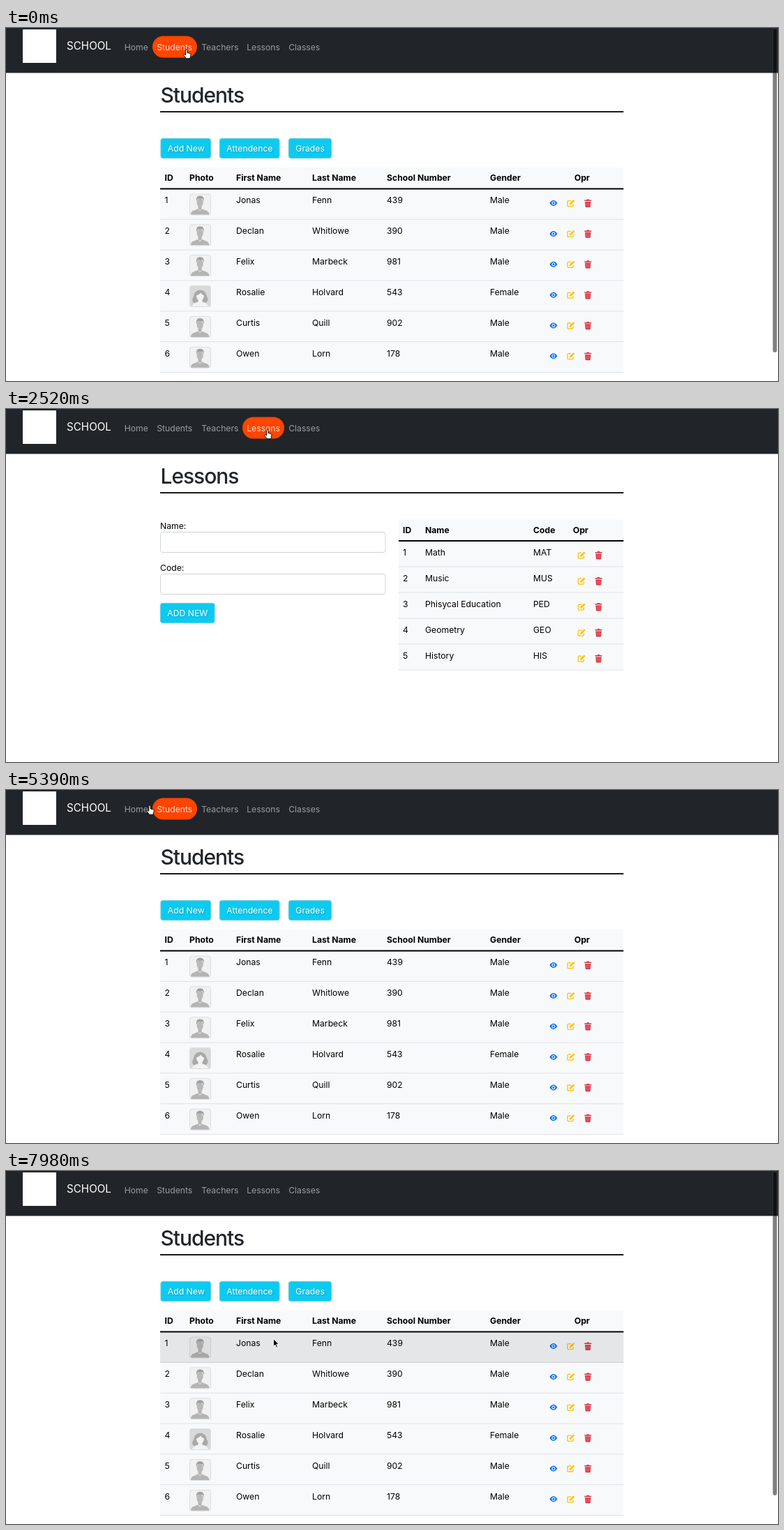
These frames come from a looping animation (1107 px wide and 506 px high, 8000 ms). An HTML page:

```html
<!DOCTYPE html>
<html lang="en">
<head>
<meta charset="utf-8">
<title>School</title>
<style>
html, body { margin: 0; width: 100%; height: 100%; overflow: hidden; background: #fff; }
svg { display: block; }
text { font: 12.2px Inter, Roboto, sans-serif; font-optical-sizing: none; fill: #000; }
.h { font-weight: 700; }
.title { font-size: 30px; font-weight: 500; letter-spacing: -1.05px; fill: #212529; }
.brand { font-size: 15.2px; fill: #fff; }
.label { font-weight: 500; fill: #6c757d; text-anchor: middle; }
.count { font-size: 24px; font-weight: 700; fill: #212529; text-anchor: middle; }
.light { fill: #fff; filter: drop-shadow(1px 1px 1px rgba(0,0,0,.2)); }
.board { font-size: 8px; font-style: italic; font-weight: 600; text-anchor: middle; }
.btn { fill: #0dcaf0; stroke: #5fcfe6; filter: drop-shadow(0 0 1px rgba(0,0,0,.15)); }
.soft { filter: blur(4px); }
.line { fill: none; stroke: #000; stroke-linecap: round; stroke-linejoin: round; }
</style>
</head>
<body>
<svg width="1107" height="506" viewBox="0 0 1107 506">
  <defs>
    <g id="male">
      <rect x=".5" y=".5" width="30" height="30" rx="3" fill="#f1f1f1" stroke="#dcdee0"/>
      <path d="M2 30q0-5 4.500-6l6-2.500v-4h5v4l6 2.500q4.500 1 5 6z" fill="#b4b4b4"/>
      <ellipse cx="15.200" cy="12.500" rx="4.600" ry="6.500" fill="#b9b9b9"/>
      <path d="M10 11q-1-8 5-8 7 0 5.500 8l-1.500-4h-7z" fill="#9f9f9f"/>
      <path d="M12 21l3.200 3.500 3.200-3.500" fill="none" stroke="#e9e9e9"/>
    </g>
    <g id="female">
      <rect x=".5" y=".5" width="30" height="30" rx="3" fill="#d9d9d9" stroke="#dcdee0"/>
      <path d="M5 24q-2-4 1-8 1-9 9.500-9.500 8 .5 9.500 9.500 3 4 0 8-3 3-6 1h-7q-4 2-7-1z" fill="#a9a9a9"/>
      <path d="M4 30q1-5 8.500-6.500v-3q-3-3-2.500-6 4-1 6-4 2 3 5 4 0 4-2.500 6v3q7.500 1.500 8.500 6.500z" fill="#f3f3f3"/>
    </g>
    <g id="eye">
      <path d="M-5.500 0Q-3-4 0-4T5.500 0Q3 4 0 4T-5.500 0z" fill="#0d6efd"/>
      <circle r="2.500" fill="#fff"/><circle r="1.500" fill="#0d6efd"/>
    </g>
    <g id="edit" fill="none" stroke="#ffc107" stroke-width="1.300">
      <path d="M.5-3.500H-3.500q-1 0-1 1V3.500q0 1 1 1H2.500q1 0 1-1V1"/>
      <path d="M-1.500 2l.4-2L4-4.800l1.500 1.500L.4 1.700z" fill="#ffc107" stroke-width=".6"/>
    </g>
    <g id="trash" fill="#dc3545">
      <path d="M-5-4.500h3l.6-1h2.800l.6 1h3V-3H-5zM-4.200-2.200h8.400l-.6 7q-.1 1-1 1h-5.200q-.9 0-1-1z"/>
      <path d="M-2-.8v5M0-.8v5M2-.8v5" stroke="#e98a93" stroke-width=".7"/>
    </g>
    <g id="suit">
      <circle cy="178" r="7.500"/>
      <path d="M-9 187h18q6 2 6 9v20q0 3-3 3H9v19q0 3-3 3H1.200V214h-2.400v27H-6q-3 0-3-3v-19h-3q-3 0-3-3v-20q0-7 6-9z" stroke="#fff"/>
      <path d="M-5 187l5 18 5-18z" fill="#fff"/>
      <path d="M-1.300 188h2.600l1.200 9-2.500 6-2.500-6z"/>
      <path d="M-9 197v20M9 197v20" stroke="#fff" stroke-width="1.200"/>
    </g>
    <g id="listener"><circle cy="219" r="4.500"/><path d="M-8 238v-7q0-6 6-6h4q6 0 6 6v7z" stroke="#fff" stroke-width=".6"/></g>
  </defs>
  <g id="pages"></g>
  <rect width="1107" height="64.400" fill="#212529"/>
  <rect x="24" y="2" width="48" height="48" fill="#fff"/>
  <text class="brand" x="87" y="31">SCHOOL</text>
  <g id="nav"></g>
  <rect id="thumb" x="1099.500" y="1" width="6" rx="3" fill="#000" fill-opacity=".5" stroke="#fff" stroke-opacity=".1"/>
  <g id="pointer" stroke-linejoin="round">
    <circle id="ring" r="25" fill="none" stroke="#000" stroke-opacity=".5" stroke-width="2"/>
    <path id="hand" d="M-1.500 7V.8a1.200 1.200 0 0 1 2.400 0V4.500l4.200 1q1 .4.900 1.600l-.6 3.400-1 2.200H-.5L-4 8.400q-.6-1 .4-1.500 1-.3 2.100 1z" fill="#fff" stroke="#000" stroke-width=".9"/>
    <path id="arrow" d="M0 0V11l2.500-2.300 1.700 4 1.800-.8-1.700-3.800h3.400z" fill="#000" stroke="#fff" stroke-width=".9"/>
  </g>
</svg>
<script>
const $ = id => document.getElementById(id);
const text = (x, y, s, cls = '') => `<text x="${x}" y="${y}" class="${cls}">${s}</text>`;
const rect = (x, y, w, h, attrs = '') => `<rect x="${x}" y="${y}" width="${w}" height="${h}" ${attrs}/>`;
const circle = (x, y, r) => `<circle cx="${x}" cy="${y}" r="${r}"/>`;
const use = (id, x, y) => `<use href="#${id}" x="${x}" y="${y}"/>`;
const path = (d, attrs = '') => `<path d="${d}" ${attrs}/>`;
const line = (d, width) => path(d, `class="line" stroke-width="${width}"`);
const button = (x, y, w, s) => rect(x + .5, y + .5, w - 1, 28, 'rx="3" class="btn"') + text(x + 10.3, y + 19.2, s, 'light');
const heading = s => text(221.5, 106.5, s, 'title') + rect(221, 119.2, 664.5, 1.8);
const each = (list, fn) => list.map(fn).join('');

// `extra` draws the photos, icons or buttons of a row whose top is y
function table(x, right, top, rowH, cols, heads, rows, extra) {
  const w = right - x, y0 = top + 30.5;
  return rect(x, top, w, 30 + rowH * rows.length, 'fill="#f8f9fa"') +
    rect(x, y0 - 1, w, 2) +
    each(heads, (s, i) => text(cols[i], top + 19.2, s, 'h')) +
    each(rows, (row, r) => {
      const y = y0 + r * rowH;
      return rect(x, y + rowH - .5, w, 1, 'fill="#dee2e6"') +
        each(row, (s, i) => s && text(cols[i], y + 20.8, s)) + extra(y, row);
    });
}

const icons = (names, x, y) => each(names, (n, i) => use(n, x + i * 24.7, y + 20.6));

function people(cols, heads, list, iconX) {
  const rows = list.split('|').map((p, i) => {
    const [first, last, number, sex] = p.split(' ');
    return [i + 1, '', first, last, number, sex === 'M' ? 'Male' : 'Female'];
  });
  return table(221, 885.5, 200, 43.85, cols, heads, rows, (y, row) =>
    use(row[5].toLowerCase(), cols[1], y + 7) + icons(['eye', 'edit', 'trash'], iconX, y));
}

function form(labels, cols, heads, list, iconX) {
  const rows = list.split('|').map(r => r.split(','));
  return each(labels, (s, i) => text(221, 171.5 + 60 * i, s) +
      rect(221.5, 176.5 + 60 * i, 322.5, 29, 'rx="3" fill="#fff" stroke="#ced4da"')) +
    button(221, 278, 78.5, 'ADD NEW') +
    table(563, 885.5, 158.5, 37, cols, heads, rows, y => icons(['edit', 'trash'], iconX, y));
}

function card(col, row, cx, label, count, art) {
  const x = 221 + 227.5 * col, y = 161 + 108 * row;
  return rect(x - 4, y + 4, 218, 98, 'rx="12" fill="#f6f6f6"') +
    rect(x + 3, y + 10, 204, 88, 'rx="4" fill-opacity=".16" class="soft"') +
    rect(x, y, 210, 92, 'rx="3" fill="#fff"') +
    text(cx, y + 16.5, label, 'label') + text(cx, y + 49.5, count, 'count') +
    line(`M${cx - 2} ${y + 70.5}l3.800 3.900-3.800 3.900`, 1.7) + art;
}

const pupils =
  circle(264, 178, 8.8) + circle(304, 181, 8) +
  line('M252.500 195l-1.500 21M275.500 195l1.500 21', 6.5) + line('M260 212v26M268 212v26', 7) +
  path('M253 190h22v24h-22z') + path('M259 190l5 11 5-11z', 'fill="#fff"') + path('M263 191h2l1 6-2 3-2-3z') +
  line('M294.500 197l-2.500 18M313.500 197l2.500 18', 5) + line('M300 224v15M308 224v15', 5) +
  path('M296 191h16v19l4 17h-24l4-17z') + path('M299.500 191l4.500 9 4.500-9z', 'fill="#fff"') +
  path('M256 198v17M272 198v17M297.500 198v12M310.500 198v12M297 211h14', 'stroke="#fff"');

const staff = each([489, 531, 510], x => use('suit', x, 0)) +
  each([520, 541], x => rect(x, 215, 6.5, 11, 'rx="1" stroke="#fff" stroke-width=".7"'));

const training = rect(717.5, 172.5, 58.5, 33, 'fill="#fff" stroke="#000" stroke-width="1.500"') +
  text(747, 191, 'Training', 'board') + circle(715, 191, 5.3) +
  line('M706.500 201v17M720 201l7 5 8-3', 4) + line('M711.500 214v23M718 214v23', 4.5) +
  path('M706 198h16l-1 19h-12z') + path('M712 198l3 9 3-9z', 'fill="#fff"') +
  each([736, 751.5, 767], x => use('listener', x, 0));

const books = line('M252 304l32-4.500 36 3.500-32 8z', 2.2) +
  each([304, 317, 330], y =>
    line(`M288 ${y + 7}l-36-7q-4 5 0 11l36 7 33-8M288 ${y + 7}l32-8q-3 5 0 10M288 ${y + 7}v11M292 ${y + 11}l26-6`, 2.2) +
    line(`M261 ${y + 3}v9M275 ${y + 6}v9`, 4)) +
  path('M299 336l10-3v17l-5-4-5 5z', 'stroke="#fff"');

const clipboard = rect(475.5, 285.5, 51.5, 62.5, 'rx="2" fill="#fff" stroke="#000" stroke-width="4.500"') +
  path('M487 294v-10h8q0-7 6-7t6 7h8v10z') + circle(501, 283, 2) +
  each([304, 315, 326, 337], y => line(`M483 ${y}h18`, 3)) +
  each([304, 317], y => line(`M508 ${y}l4 4 8-8`, 2.8));

const home = heading('Home') +
  card(0, 0, 380, 'Students', 6, pupils) +
  card(1, 0, 607.5, 'Teachers', 5, staff) +
  card(2, 0, 837, 'Classes', 7, training) +
  card(0, 1, 381.5, 'Lessons', 5, books) +
  card(1, 1, 598, 'Take Attendece', 2, clipboard) +
  rect(221, 390, 665, 130, 'fill-opacity=".1" class="soft"') +
  rect(221.5, 386.5, 663.5, 130, 'rx="3" fill="#fff" stroke="#7dd6e8"') +
  rect(221.5, 386.5, 663.5, 31.5, 'rx="3" class="btn"') +
  text(234.5, 406.8, 'Students Not Attending School Today', 'light') +
  table(234, 873, 431, 43.5, [240, 275, 381, 527, 657],
    ['ID', 'Full Name', 'School Number', 'Description', 'Operation'],
    [[1, 'Jonas Fenn', 439, 'He was sick']],
    y => button(657, y + 7.7, 150.5, 'Inform Parent by Email'));

const students = heading('Students') +
  button(221.5, 158, 72.5, 'Add New') + button(306, 158, 86.5, 'Attendence') + button(405, 158, 62, 'Grades') +
  people([227.5, 263, 330, 439, 546, 694, 815],
    ['ID', 'Photo', 'First Name', 'Last Name', 'School Number', 'Gender', 'Opr'],
    'Jonas Fenn 439 M|Declan Whitlowe 390 M|Felix Marbeck 981 M|Rosalie Holvard 543 F|Curtis Quill 902 M|Owen Lorn 178 M', 785) +
  rect(221, 231.5, 664.5, 43.5, 'id="rowHover" fill="#212529" fill-opacity=".09"');

const teachers = heading('Teachers') + button(221.5, 158, 72.5, 'Add New') +
  people([227.5, 266, 339, 435.5, 552, 676, 762.5],
    ['ID', 'Photo', 'Name', 'Last Name', 'Personal ID', 'Gender', 'Opr'],
    'Iris Harwell 109167 F|Noel Brisk 109807 M|Josefina Coldrey 109432 F|Paul Orwick 1060 M|Lucinda Mendoya 2043 F', 774.5);

const lessons = heading('Lessons') + form(['Name:', 'Code:'], [569, 601, 756, 813],
  ['ID', 'Name', 'Code', 'Opr'],
  '1,Math,MAT|2,Music,MUS|3,Phisycal Education,PED|4,Geometry,GEO|5,History,HIS', 825);

const classes = heading('Classes') + form(['Class:', 'Section:'], [569, 658, 772.5],
  ['Class', 'Section', 'Opr'], '1,A|1,B|1,C|1,D|2,A|2,B|2,C', 785);

const pages = { home, students, teachers, lessons, classes };
$('pages').innerHTML = each(Object.entries(pages), ([id, body]) => `<g id="${id}">${body}</g>`);

const names = ['Home', 'Students', 'Teachers', 'Lessons', 'Classes'];
const edges = [163.5, 210, 274, 339, 399, 456];
$('nav').innerHTML = each(names, (s, i) =>
  rect(edges[i], 11.5, edges[i + 1] - edges[i], 31, 'rx="15.500" fill="#ff4500"') + text(edges[i] + 6.2, 31.5, s));
const pills = [...$('nav').querySelectorAll('rect')];
const links = [...$('nav').querySelectorAll('text')];

const STEP = 70, LOOP = 8000;
// Click time, load time, page
const visits = [[0, 0, 'students'], [840, 980, 'teachers'], [2240, 2380, 'lessons'], [3290, 3500, 'classes'],
  [5110, 5250, 'students'], [5880, 5950, 'home'], [7350, 7490, 'students']];
// Pointer moves: start, end, target x, y
const moves = [[70, 350, 296, 30], [1400, 1750, 353, 30], [1750, 2030, 375, 30], [2800, 3220, 432, 31],
  [4340, 4550, 312, 13], [4550, 4970, 212, 22], [5320, 5600, 189, 24],
  [6510, 6860, 265, 46], [6860, 7000, 335, 119.5], [7000, 7280, 381, 235], [7490, 7700, 383.5, 240.5]];
// Scrollbar: shown from, fading from, length
const scrolls = [[0, 980, 464], [5950, 6510, 410], [7490, LOOP, 464]];

const clamp = v => Math.max(0, Math.min(1, v));
const smooth = v => v * v * (3 - 2 * v);

function pointerAt(t) {
  let x = 259, y = 31;
  for (const [start, end, tx, ty] of moves) {
    const p = clamp((t - start) / (end - start));
    x += (tx - x) * p;
    y += (ty - y) * p;
  }
  return { x, y };
}

// Hover highlights trail the pointer by one step, rising slower than they fall
function highlights(time) {
  const hit = t => {
    const { x, y } = pointerAt(t);
    return names.map((_, i) => y < 43 && x >= edges[i] && x < edges[i + 1]);
  };
  let levels = hit(0).map(Number);
  for (let t = 0; t < time; t += STEP) {
    const over = hit(t);
    levels = levels.map((v, i) => clamp(v + (over[i] ? 1 / 3 : -.43)));
  }
  return levels.map(smooth);
}

const show = (id, on) => $(id).style.display = on ? '' : 'none';

function draw(now) {
  const time = now % LOOP, t = time - time % STEP;
  const page = visits.filter(v => v[1] <= t).pop()[2];
  for (const id in pages) show(id, id === page);

  highlights(t).forEach((a, i) => {
    pills[i].style.opacity = a;
    links[i].style.fill = `rgba(255,255,255,${.55 + .25 * a})`;
  });

  const { x, y } = pointerAt(t);
  const overLink = y < 43 || page === 'home' && y > 225;
  $('pointer').setAttribute('transform', `translate(${x} ${y})`);
  show('hand', overLink);
  show('arrow', !overLink);
  show('ring', visits.some(([click, load]) => t >= click && t < load));
  show('rowHover', y > 231);

  const [, fade, length] = scrolls.filter(s => s[0] <= t).pop();
  $('thumb').setAttribute('height', length);
  $('thumb').style.opacity = clamp(1 - (t - fade) / 210);
  requestAnimationFrame(draw);
}
requestAnimationFrame(draw);
</script>
</body>
</html>
```
